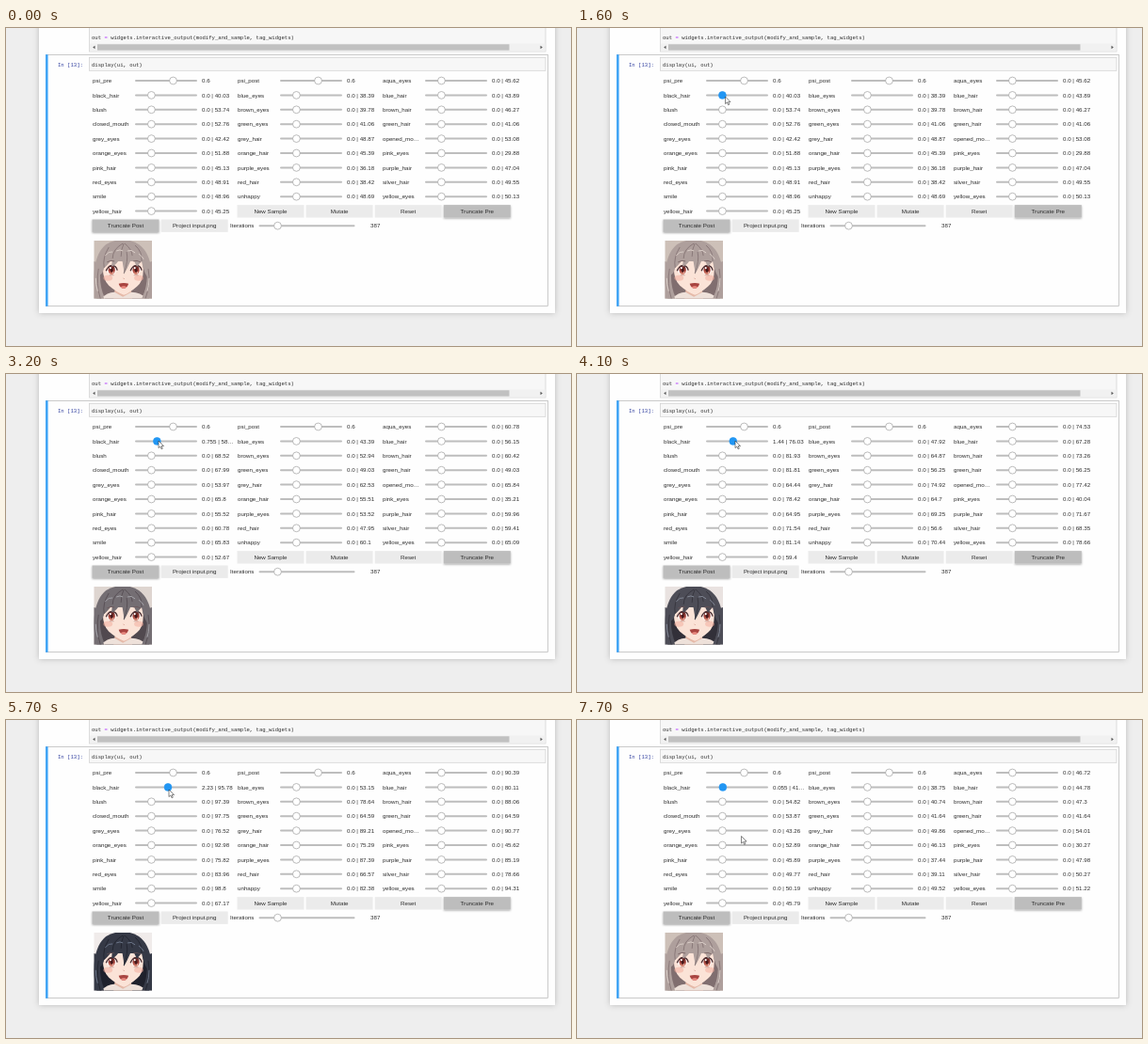
These frames come from a looping animation (600 px wide and 338 px high, 8 s). An HTML page:

```html
<!DOCTYPE html>
<html lang="en">
<head>
<meta charset="utf-8">
<title>Tag sliders</title>
<style>
html, body { margin: 0; height: 100%; overflow: hidden; background: #eee; }
svg { display: block; }
text { font: 6.2px "Liberation Sans", Arial, sans-serif; fill: #2c2c2c; }
text.code { font: 5.6px "Liberation Mono", "DejaVu Sans Mono", monospace; white-space: pre; }
.hair { fill: var(--hair); }
.shade { fill: var(--shade); }
.strand { fill: none; stroke: var(--shade); stroke-width: .8; }
.shine { fill: none; stroke: var(--shine); stroke-width: 1; }
</style>
</head>
<body>
<svg id="stage" width="600" height="338" viewBox="0 0 600 338">
  <defs>
    <filter id="soft" x="-10%" y="-30%" width="120%" height="170%">
      <feDropShadow dx="0" dy="1" stdDeviation="1" flood-opacity=".35"/>
    </filter>
    <filter id="page" x="-5%" y="-5%" width="110%" height="110%">
      <feDropShadow dx="0" dy="0" stdDeviation="3" flood-opacity=".22"/>
    </filter>
    <linearGradient id="iris" x2="0" y2="1">
      <stop stop-color="#54201f"/><stop offset=".55" stop-color="#a8443c"/><stop offset="1" stop-color="#e39a84"/>
    </linearGradient>
    <g id="eye">
      <path d="M-5.5 1Q-3-5 1-4.6Q5-4 5.5 0Q4 5 0 5.4Q-4 5-5.5 1Z" fill="#fff6f2"/>
      <ellipse rx="3.6" ry="5" fill="url(#iris)"/>
      <ellipse rx="1.5" ry="2.3" fill="#46191b"/>
      <circle cx="-1.4" cy="-2.3" r="1.1" fill="#fff"/>
      <circle cx="1.5" cy="2.6" r=".6" fill="#ffe4da"/>
      <path d="M-6 1Q-3.5-5.4 1-5Q5-4.6 6 .4" fill="none" stroke="#4b2f33" stroke-width="1.3"/>
      <path d="M-2.4 5.4H2.4" stroke="#a2675f" stroke-width=".5"/>
    </g>
  </defs>
  <rect width="600" height="338" fill="#eee"/>
  <rect x="35" y="-10" width="548" height="313" fill="#fefefe" filter="url(#page)"/>

  <rect x="88.5" y="-5" width="484.5" height="30" fill="#f7f7f7" stroke="#cfcfcf" stroke-width=".7"/>
  <text class="code" x="91" y="12">out <tspan fill="#a2f">=</tspan> widgets.interactive_output(modify_and_sample, tag_widgets)</text>
  <rect x="89" y="16.5" width="483.5" height="8" fill="#f1f1f1"/>
  <rect x="97" y="17.3" width="437.5" height="6.4" fill="#c1c1c1"/>
  <path d="M94.5 18.8V22.2L92.2 20.5ZM567.5 18.8V22.2L569.8 20.5Z" fill="#555"/>

  <rect x="42.5" y="28.5" width="533" height="267" fill="#fefefe" stroke="#b5b5b5" stroke-width=".7"/>
  <rect x="42" y="28.2" width="2.6" height="267.6" fill="#42a5f5"/>
  <text class="code" x="55" y="40.7" style="fill:#303f9f">In [13]:</text>
  <rect x="88.5" y="31.3" width="484.5" height="14" fill="#f7f7f7" stroke="#cfcfcf" stroke-width=".7"/>
  <text class="code" x="91" y="40.7">display(ui, out)</text>

  <g id="ui"></g>

  <svg id="portrait" x="93.3" y="226" width="61.7" height="61.7" viewBox="0 0 62 62">
    <rect width="62" height="62" style="fill:var(--back)"/>
    <path class="hair" d="M3 62C-3 40 0 14 13 4Q31-6 48 4C62 14 65 38 59 62Z"/>
    <path class="shade" d="M8 24Q4 46 12 62H51Q60 44 55 22Z"/>
    <path d="M23 48H39L41 62H21Z" fill="#e5b9a8"/>
    <path d="M8 62Q14 55 22 55L31 60 40 55Q50 55 56 62Z" fill="#eee1da"/>
    <path d="M10 22H52Q55 42 46 49Q38 56 32 58Q24 55 16 48Q8 40 10 22Z" fill="#fbe3d7"/>
    <ellipse cx="15" cy="40" rx="5" ry="3" fill="#f2a99a" opacity=".5"/>
    <ellipse cx="48" cy="40" rx="5" ry="3" fill="#f2a99a" opacity=".5"/>
    <use href="#eye" x="19" y="31.5"/>
    <use href="#eye" x="45" y="31.5"/>
    <path d="M31.5 40L32.4 41" stroke="#c98575" stroke-width=".8"/>
    <path d="M26.5 46Q32 44.6 37 46Q35.5 51 31.8 51Q28 51 26.5 46Z" fill="#a84440"/>
    <path d="M28.6 49.4Q32 47.6 35 49.4Q34 51 31.8 51Q29.6 51 28.6 49.4Z" fill="#ec8d83"/>
    <path class="hair" d="M6 37Q5 16 16 5Q32-4 47 5Q59 14 57 39Q53 33 51 22Q48 25 46 28Q43 23 41 16Q38 26 32 36Q32 26 29 17Q25 25 19 28Q19 23 20 19Q14 27 11 29Q10 35 6 37Z"/>
    <path class="hair" d="M6 24Q2 43 11 62H0V22ZM56 24Q61 43 51 62H62V22Z"/>
    <path class="strand" d="M31 3Q20 9 20 19M33 3Q41 10 41 16M29 17Q29 9 32 3M44 5Q52 12 51 22M16 7Q9 18 11 29M5 30Q2 46 7 62M58 30Q61 46 55 62M32 35Q37 22 35 12"/>
    <path class="shine" d="M12 16Q16 11 20 12M24 11Q28 9 31 11M36 11Q40 9 44 13M48 14Q52 17 53 20M2 40Q2 47 4 54M59 40Q59 48 57 54"/>
    <path d="M14 23Q18 20.5 22 22M42 22Q46 20.5 50 23" fill="none" stroke="#6b5254" stroke-width=".7"/>
  </svg>

  <path id="cursor" d="M0 0V7.6L1.8 6 3.1 8.8 4.3 8.2 3.1 5.6H5.5Z" fill="#fff" stroke="#222" stroke-width=".55"/>
</svg>
<script>
const LOOP = 8000, TOP = 2.23;
const $ = id => document.getElementById(id);

// Tag, score at slider 0 and score at slider TOP, in reading order.
const tags = `aqua_eyes 45.62 90.39,black_hair 40.03 95.78,blue_eyes 38.39 53.15,blue_hair 43.89 80.11,
blush 53.74 97.39,brown_eyes 39.78 78.64,brown_hair 46.27 88.06,closed_mouth 52.76 97.75,
green_eyes 41.06 64.59,green_hair 41.06 64.59,grey_eyes 42.42 76.52,grey_hair 48.87 89.21,
opened_mo… 53.08 90.77,orange_eyes 51.88 92.98,orange_hair 45.39 75.29,pink_eyes 29.88 45.62,
pink_hair 45.13 75.82,purple_eyes 36.18 87.39,purple_hair 47.04 85.19,red_eyes 48.91 83.96,
red_hair 38.42 66.57,silver_hair 49.55 78.66,smile 48.96 98.8,unhappy 48.69 82.38,
yellow_eyes 50.13 94.31,yellow_hair 45.25 67.17`.split(/,\s*/).map(s => {
  const [name, low, high] = s.split(' ');
  return { name, low: +low, high: +high };
});

function add(tag, attrs, content = '') {
  const el = document.createElementNS('http://www.w3.org/2000/svg', tag);
  for (const k in attrs) el.setAttribute(k, attrs[k]);
  el.textContent = content;
  return $('ui').appendChild(el);
}
const label = (x, y, s, anchor = 'start') => add('text', { x, y: y + 2.2, 'text-anchor': anchor }, s);

function slider(x, y, width, knobX) {
  add('rect', { x, y: y - 1, width, height: 2, rx: 1, fill: '#bdbdbd' });
  return add('circle', { cx: knobX, cy: y, r: 3.9, fill: '#fff', stroke: '#a0a0a0', 'stroke-width': .7 });
}

function button(x, y, name, on) {
  const look = on ? { fill: '#bdbdbd', filter: 'url(#soft)' } : { fill: '#ebebeb' };
  add('rect', { x, y: y - 6.7, width: 71, height: 13.4, ...look });
  label(x + 35.5, y, name, 'middle');
}

const rows = [{ name: 'psi_pre' }, { name: 'psi_post' }, ...tags];
rows.forEach((row, i) => {
  const x = 92 + i % 3 * 154, y = 56 + Math.floor(i / 3) * 15.4;
  label(x, y, row.name);
  row.knob = slider(x + 45, y, 66, x + (i < 2 ? 85.5 : 62.4));
  row.out = label(x + 116, y, '0.6');
});
const black = tags[1];

['New Sample', 'Mutate', 'Reset', 'Truncate Pre'].forEach((s, i) => button(245.5 + i * 73.1, 194.8, s, i == 3));
button(91.5, 210.2, 'Truncate Post', true);
button(164.7, 210.2, 'Project input.png');
label(238, 210.2, 'Iterations');
slider(268.5, 210.2, 102, 288.5);
label(387, 210.2, '387');

// Eased value between [time, value...] keys, held outside them.
function track(t, keys) {
  const n = keys.findIndex(k => k[0] > t);
  if (n == 0) return keys[0].slice(1);
  if (n < 0) return keys.at(-1).slice(1);
  const a = keys[n - 1], b = keys[n];
  const u = (t - a[0]) / (b[0] - a[0]), e = u * u * (3 - 2 * u);
  return a.slice(1).map((v, i) => v + (b[i + 1] - v) * e);
}
const step = (t, keys) => keys.findLast(k => k[0] <= t)[1];

const dragKeys = [[1600, 0], [2400, .755], [3200, .755], [3650, 1.44], [4100, 1.44], [4650, TOP], [6399, TOP], [6400, .055]];
const scoreKeys = [[0, 0], [2500, .755], [3700, 1.44], [4700, TOP], [6700, .055]];
const hairKeys = [[2600, 0], [2900, .48], [3800, .48], [4100, .8], [4950, .8], [5200, 1], [7000, 1], [7300, 0]];
const cursorKeys = [[700, 446, 47], [1450, 157.5, 73], [1600, 157.5, 73], [2400, 162, 71], [3200, 162, 71],
  [3650, 168, 71], [4100, 168, 71], [4650, 174, 71], [5350, 174, 71], [5500, 177, 72], [5700, 173, 74],
  [6100, 154, 72], [6850, 154, 72], [7500, 174, 122], [7700, 174.5, 123.5]];
const tones = {
  hair: [[174, 159, 156], [53, 57, 70]],
  shade: [[128, 110, 111], [31, 33, 44]],
  shine: [[218, 206, 200], [108, 118, 138]],
  back: [[205, 192, 184], [240, 235, 234]]
};

const round = v => String(Math.round(v * 100) / 100);
const clip = s => s.length > 12 ? s.slice(0, 10) + '…' : s;
let shown;

function showScores(v) {
  if (v === shown) return;
  shown = v;
  for (const tag of tags) {
    const score = round(tag.low + (tag.high - tag.low) * v / TOP);
    tag.out.textContent = clip(`${tag == black && v ? v : '0.0'} | ${score}`);
  }
}

function draw(t) {
  showScores(step(t, scoreKeys));
  black.knob.setAttribute('cx', 154.4 + 7.9 * track(t, dragKeys)[0]);
  black.knob.setAttribute('fill', t < 1500 ? '#fff' : '#2196f3');
  black.knob.setAttribute('stroke', t < 1500 ? '#a0a0a0' : '#2196f3');

  const [dark] = track(t, hairKeys);
  for (const name in tones) {
    const [a, b] = tones[name];
    $('portrait').style.setProperty('--' + name, `rgb(${a.map((v, i) => Math.round(v + (b[i] - v) * dark))})`);
  }

  $('cursor').setAttribute('visibility', t < 700 ? 'hidden' : 'visible');
  $('cursor').setAttribute('transform', `translate(${track(t, cursorKeys)})`);
}

const start = performance.now();
function frame() {
  draw((performance.now() - start) % LOOP);
  requestAnimationFrame(frame);
}
frame();
</script>
</body>
</html>
```
